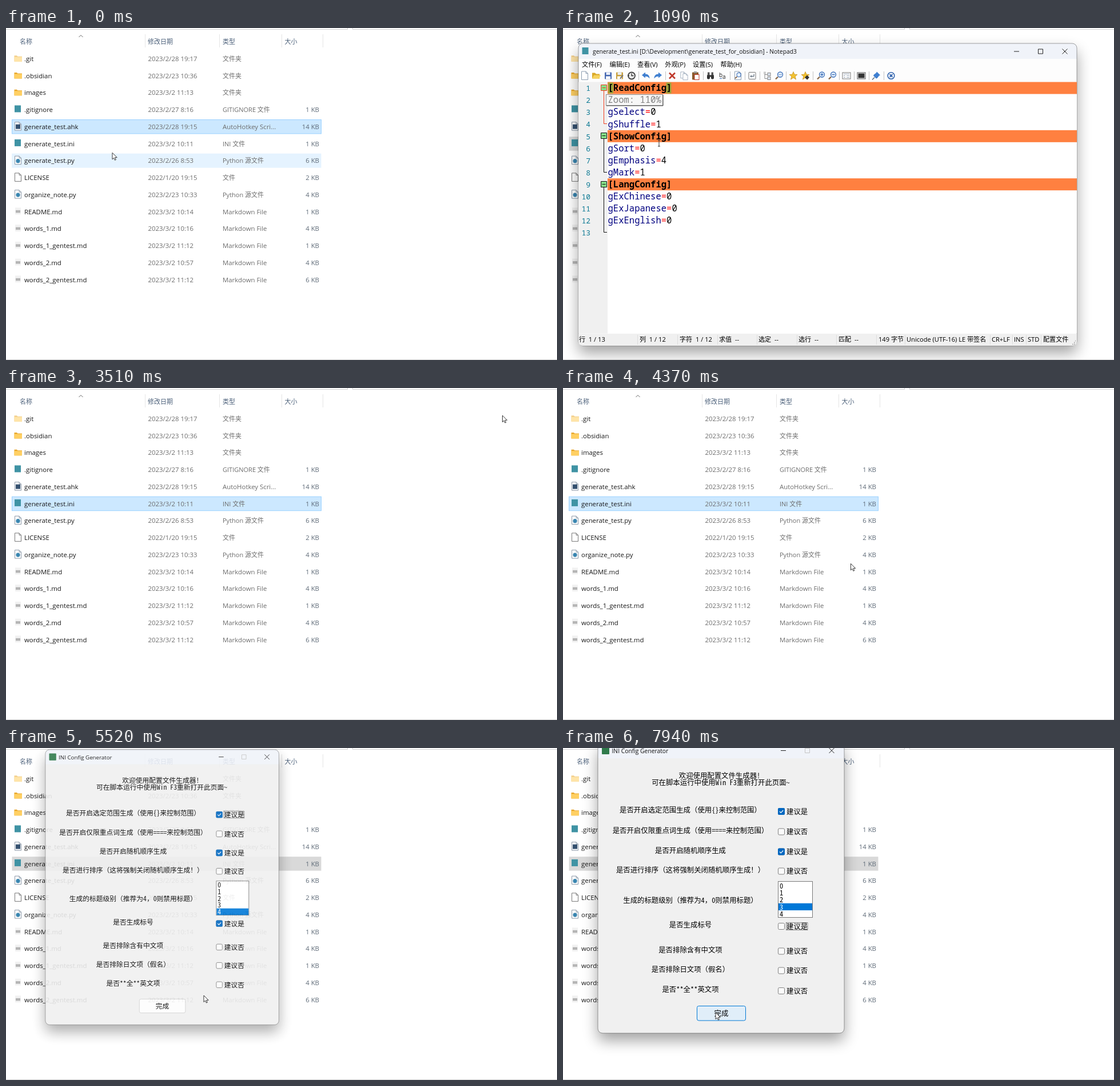
An HTML page that plays this animation: 964 px wide and 581 px high, repeating every 8 s.

```html
<!DOCTYPE html>
<html lang="zh-CN">
<head>
<meta charset="utf-8">
<title>INI Config Generator</title>
<style>
html,body{margin:0;width:100%;height:100%;overflow:hidden;background:#fff}
svg{display:block;width:100vw;height:100vh}
text{font-family:'Open Sans','Noto Sans CJK SC','Noto Sans CJK',sans-serif;white-space:pre}
.code text{font-family:'Noto Sans Mono','DejaVu Sans Mono',monospace}
.song text{font-family:'Noto Sans Mono CJK SC','Noto Sans CJK SC','Noto Sans CJK',sans-serif;font-weight:300}
.off{filter:grayscale(1);opacity:.5}
</style>
</head>
<body>
<svg id="stage" viewBox="0 0 964 581"></svg>
<script>
const LOOP = 8000;
const OPEN_EDITOR = 660, CLOSE_EDITOR = 3345, OPEN_DIALOG = 5472;
const SELECT_INI = 400, CLICK_LINE = 2270, PICK_LEVEL = 6370, UNCHECK = 7110;

const text = (x, y, s, size, fill = '#000', more = '') =>
  `<text x="${x}" y="${y}" font-size="${size}" fill="${fill}" ${more}>${s}</text>`;
const rect = (x, y, w, h, fill, more = '') =>
  `<rect x="${x}" y="${y}" width="${w}" height="${h}" fill="${fill}" ${more}/>`;
const line = (d, color, more = '') => `<path d="${d}" fill="none" stroke="${color}" ${more}/>`;
const shape = (d, fill, more = '') => `<path d="${d}" fill="${fill}" ${more}/>`;
const group = (body, more = '') => `<g ${more}>${body}</g>`;
const MIDDLE = 'text-anchor="middle"', END = 'text-anchor="end"';

/* File list */
const files = [
  ['folder', '.git', '2023/2/28 19:17', '文件夹', '', .55],
  ['folder', '.obsidian', '2023/2/23 10:36', '文件夹', ''],
  ['folder', 'images', '2023/3/2 11:13', '文件夹', ''],
  ['note', '.gitignore', '2023/2/27 8:16', 'GITIGNORE 文件', '1 KB'],
  ['ahk', 'generate_test.ahk', '2023/2/28 19:15', 'AutoHotkey Scri...', '14 KB'],
  ['note', 'generate_test.ini', '2023/3/2 10:11', 'INI 文件', '1 KB'],
  ['py', 'generate_test.py', '2023/2/26 8:53', 'Python 源文件', '6 KB'],
  ['page', 'LICENSE', '2022/1/20 19:15', '文件', '2 KB'],
  ['py', 'organize_note.py', '2023/2/23 10:33', 'Python 源文件', '4 KB'],
  ['md', 'README.md', '2023/3/2 10:14', 'Markdown File', '1 KB'],
  ['md', 'words_1.md', '2023/3/2 10:16', 'Markdown File', '4 KB'],
  ['md', 'words_1_gentest.md', '2023/3/2 11:12', 'Markdown File', '1 KB'],
  ['md', 'words_2.md', '2023/3/2 10:57', 'Markdown File', '4 KB'],
  ['md', 'words_2_gentest.md', '2023/3/2 11:12', 'Markdown File', '6 KB']
];
const rowY = i => 53.7 + 29.74 * i;
const uiSize = s => /[一-龥]/.test(s) ? 11 : 11.4;
const page = color => shape('M-5.5-7.5H2L5.5-4V7H-5.5Z', '#fff', `stroke="${color}"`) +
  line('M2-7.5V-4H5.5', color);
const fileIcons = {
  folder: shape('M-6.5-5H-2L-.5-3.5H7V5.5H-6.5Z', '#e8a72c') + rect(-6.5, -2.5, 13.5, 8, '#ffd063'),
  note: rect(-6, -7, 11, 12, '#3f93a4'),
  page: page('#777'),
  ahk: page('#8a97a6') + rect(-4, -3.5, 8, 8, '#34506f'),
  py: page('#8a97a6') + '<circle cy="1" r="3.6" fill="#3a86b0"/>',
  md: rect(-5, -6.5, 10, 12, '#f2f2f2') + rect(-4, -2, 8, 4.5, '#b5b5b5')
};

function explorer() {
  let s = line('M0 2.5H597.5V0M964 2.5H606.5V0M0 580.5H964', '#d2d2d2') +
    line('M243.5 11V34M373.5 11V34M482.5 11V34M554.5 11V34', '#e5e5e5') +
    line('M127.5 16L131 12.5L134.5 16', '#666');
  [[24, '名称'], [248, '修改日期'], [379, '类型'], [487.5, '大小']]
    .forEach(([x, name]) => s += text(x, 27.5, name, 11, '#4c607a'));
  s += rect(10, 0, 541.5, 25, '#e5f3ff', 'id="hover"') +
    rect(10.5, 0, 541, 24.5, '#cce8ff', 'id="picked"');
  files.forEach(([icon, name, date, type, size, alpha = 1], i) => {
    const y = rowY(i), base = y + 4.2;
    s += group(fileIcons[icon], `transform="translate(21 ${y - .5})" opacity="${alpha}"`) +
      text(32, base, name, 11.4, '#191919') +
      text(248.5, base, date, 11.4, '#6d6d6d') +
      text(379, base, type, uiSize(type), '#6d6d6d') +
      text(548, base, size, 11.4, '#5f6b78', END);
  });
  return s;
}

/* Shared window frame */
function frame(x, y, w, h, bar, body) {
  return rect(x, y + 13, w, h, '#000', 'rx="8" opacity=".36" filter="url(#blur)"') +
    rect(x, y, w, h, body, 'rx="8"') +
    shape(`M${x} ${y + bar}V${y + 8}q0-8 8-8H${x + w - 8}q8 0 8 8V${y + bar}Z`, '#f0f3f9') +
    rect(x, y, w, h, 'none', 'rx="8" stroke="#000" stroke-opacity=".35"');
}
const buttons = (x, y, maxColor) => line(`M${x - 89} ${y}h9`, '#222') +
  line(`M${x - 46.5} ${y - 4}h8v8h-8z`, maxColor) +
  line(`M${x - 4.5} ${y - 4.5}l9 9m0-9l-9 9`, '#222');

/* Editor toolbar */
const lens = (inner, c = '#3d6fb8') => line('M-2 2L-6 6', '#8a6a4a', 'stroke-width="2.4"') +
  `<circle cx="2" cy="-2" r="4.5" fill="#e4effc" stroke="${c}" stroke-width="1.3"/>` + line(inner, c, 'stroke-width="1.4"');
const star = shape('M0-7L2-2.3L7-2L3.2 1.2L4.5 6.5L0 3.5L-4.5 6.5L-3.2 1.2L-7-2L-2-2.3Z', '#f2c230', 'stroke="#c08a1c" stroke-width=".7"');
const disk = c => rect(-6, -6, 12, 12, c, 'rx="1"') + rect(-3.5, -6, 7, 4.5, '#e9eef8') + rect(-4, 1, 8, 5, '#fff');
const bend = shape('M-7-1L-1-6V-3C4-3 6.5 0 6.5 5C4 1.5 2 1-1 1.2V4Z', '#3f7fd0');
const pane = c => rect(-7, -5.5, 14, 11, '#fff', `stroke="${c}"`);
const sheet = page('#8c9db0');
const tools = [
  [38, sheet],
  [58, shape('M-7-5H-2L0-3H6V5H-7Z', '#d9a827') + shape('M-7 5L-4-1H8L5 5Z', '#f6d35e')],
  [79, disk('#4467b0'), 1],
  [99, disk('#c9a03c') + line('M1 5L6-1', '#777', 'stroke-width="2"')],
  [120, '<circle r="6" fill="#ececec" stroke="#444" stroke-width="1.8"/>' + line('M0-4V0H3.5M-7 0H-4', '#333', 'stroke-width="1.3"')],
  [145, bend, 1],
  [166, group(bend, 'transform="scale(-1 1)"'), 1],
  [191, line('M-5-5L5 5M5-5L-5 5', '#c0392b', 'stroke-width="2.6"'), 1],
  [212, group(sheet, 'transform="translate(-2 -1) scale(.75)"') + group(sheet, 'transform="translate(2 2) scale(.75)"'), 1],
  [232, rect(-6, -6, 11, 13, '#8a5a2c', 'rx="1"') + rect(-3, -7.5, 5, 3, '#999') + rect(-2, -2, 8, 9, '#fff', 'stroke="#c0392b"')],
  [258, rect(-6, -2, 5, 8, '#333', 'rx="2"') + rect(1, -2, 5, 8, '#333', 'rx="2"') + rect(-5, -6, 3.5, 5, '#555') + rect(1.5, -6, 3.5, 5, '#555') + rect(-2, -1, 4, 3, '#333')],
  [279, text(-6, 2, 'b', 10, '#222') + text(0, 5, 'a', 10, '#222') + line('M-5 5H-1', '#3d6fb8')],
  [306, sheet + group(lens('M0 0'), 'transform="scale(.8)"')],
  [331, rect(-6, -6, 12, 12, '#fff', 'stroke="#777" rx="1"') + line('M3-3V1H-3M-1-1L-3 1L-1 3', '#456')],
  [357, line('M-4-6V5H2M-4-2H2', '#888') + rect(-6, -7, 4, 4, '#ccc') + rect(1, -5, 5, 5, '#dde6f2', 'stroke="#888"') + rect(1, 2, 5, 5, '#dde6f2', 'stroke="#888"')],
  [378, lens('M-.5-2h1m1 0h1m1 0h1')],
  [403, star],
  [424, star + shape('M3-1L7 3L3 7L-1 3Z', '#333')],
  [451, lens('M-.5-2H4.5M2-4.5V.5')],
  [471, lens('M-.5-2H4.5')],
  [496, pane('#777') + line('M-5-3H5M-5 0H-2M0 0H5M-5 3H-2M0 3H5', '#9aa7b8')],
  [522, pane('#555') + rect(-5.5, -4, 11, 8, '#333')],
  [548, shape('M1-7L7-1L5 0L2 4L0 5L-5 0L-4-2L0-5Z', '#3f7fd0') + line('M-3 3L-7 7', '#567', 'stroke-width="1.4"')],
  [574, '<circle r="5.8" fill="#fff" stroke="#2f62ad" stroke-width="1.6"/>' + line('M-2.5-2.5L2.5 2.5M2.5-2.5L-2.5 2.5', '#2f62ad', 'stroke-width="1.8"')]
];
const toolGaps = [132.5, 179.5, 245.5, 292.5, 318.5, 344.5, 390.5, 437.5, 483.5, 509.5, 535.5, 561.5];

const ini = ['[ReadConfig]', 'gScope=1', 'gSelect=0', 'gShuffle=1', '[ShowConfig]', 'gSort=0', 'gEmphasis=4',
  'gMark=1', '[LangConfig]', 'gExChinese=0', 'gExJapanese=0', 'gExEnglish=0', ''];
const lineY = i => 105 + 21.08 * i;
const MONO = 15.55;

function editor() {
  let s = frame(27, 27, 872, 529, 27, '#fdfdfd') + rect(33.5, 34, 11, 12, '#3f93a4') +
    text(52, 45, 'generate_test.ini [D:\\Development\\generate_test_for_obsidian] - Notepad3', 10.3, '#111') +
    buttons(878, 41, '#222');
  ['文件(F)', '编辑(E)', '查看(V)', '外观(P)', '设置(S)', '帮助(H)']
    .forEach((m, i) => s += text(33 + 48.5 * i, 67.5, m, 11.2));
  s += group([321.5, 440.5].map(x => rect(x, 74.5, 20, 18, '#cce4f7', 'stroke="#90c8f6"')).join(''), 'id="toggles"');
  s += tools.map(([x, icon, dims]) => group(icon, `transform="translate(${x} 83.5)"` + (dims ? ' data-dims' : ''))).join('') +
    line(toolGaps.map(x => `M${x} 76V91`).join(''), '#c4c4c4');

  let code = rect(27, 94.5, 51, 440, '#f0f0f0') + rect(78, 94.5, 821, 440, '#fff') +
    rect(79, 347.5, 819, 19.5, 'none', 'id="current" stroke="#e2e2e2" stroke-width="1.5"');
  ini.forEach((row, i) => {
    const y = lineY(i), base = y + 5.3;
    code += text(48, y + 5.2, i + 1, 12.9, '#0d7a94', END + ' font-weight="500"');
    if (row[0] === '[') {
      code += rect(78, y - 10.5, 821, 21, '#ff8040');
      if (!i) code += group(rect(79, y - 9.5, 9, 19, '#9da43c') + rect(180.5, y - 9.5, 9, 19, '#9da43c'), 'id="match"');
      code += text(78.5, base, row, MONO, '#000', 'font-weight="bold"');
    } else if (row) {
      const [key, value] = row.split('=');
      code += text(78.5, base, `${key}<tspan fill="#f00">=</tspan><tspan fill="#000">${value}</tspan>`, MONO, '#000080');
    }
  });
  [[0, 3], [4, 7], [8, 12]].forEach(([a, b]) => {
    const top = Math.round(lineY(a)) - .5, end = Math.round(lineY(b)) - .5;
    code += group(shape(`M66.5 ${top - 5}h10v10h-10z`, '#86e08a') +
      line(`M68.5 ${top}h6M71.5 ${top + 5}V${end}H77`, 'inherit'), 'class="fold" stroke="#111"');
  });
  code += group(rect(75.5, 116.5, 99, 19, '#f7f7f7', 'stroke="#8a8a8a"') + line('M76 136H175V117', '#444') +
    text(78.5, 131, 'Zoom: 110%', MONO, '#808080'), 'id="zoom"');
  s += group(code.replaceAll('stroke="inherit"', ''), 'class="code"');

  s += shape('M27 535H899V548q0 8-8 8H35q-8 0-8-8Z', '#f0f0f0') +
    line([130, 200, 270, 339, 409, 478, 548, 598, 747, 786, 810, 836].map(x => `M${x}.5 537V554`).join(''), '#dcdcdc');
  [[28, '行', 'row'], [134, '列', 'col'], [204, '字符', 'chr'], [273, '求值  --'], [342, '选定  --'], [412, '选行  --'],
    [482, '匹配  --'], [552, '149 字节'], [601, 'Unicode (UTF-16) LE 带签名'], [750, 'CR+LF'], [789, 'INS'],
    [813, 'STD'], [840, '配置文件']]
    .forEach(([x, label, id]) => s += text(x, 549, label, 11.1, '#000', id ? `id="${id}"` : ''));
  return s + line('M891 553.5h6M894 550.5h3M896 547.5h1', '#aaa', 'stroke-width="2" stroke-dasharray="1.6 1.4"');
}

/* Settings dialog */
const SONG = 12.4;
const options = [
  [108, 111, '是否开启选定范围生成（使用{}来控制范围）', 1],
  [144, 146.5, '是否开启仅限重点词生成（使用====来控制范围）', 0],
  [179, 181.5, '是否开启随机顺序生成', 1],
  [213, 215.5, '是否进行排序（这将强制关闭随机顺序生成！）', 0],
  [266, 0, '生成的标题级别（推荐为4，0则禁用标题）'],
  [309.5, 312, '是否生成标号', 1],
  [353, 355.5, '是否排除含有中文项', 0],
  [387, 389.5, '是否排除日文项（假名）', 0],
  [422.5, 425, '是否**全**英文项', 0]
];
const levelY = i => 241 + 12.35 * i;

function dialog() {
  let s = frame(61, -9, 431, 508, 27, '#f0f0f0') + rect(68, -2, 13, 13, '#2f7a4b', 'rx="1"') +
    text(85.5, 8.7, 'INI Config Generator', 10.3, '#111') + buttons(470, 4.5, '#c4c4c4');
  let body = text(274, 52.6, '欢迎使用配置文件生成器!', SONG, '#000', MIDDLE) +
    text(276, 65, '可在脚本运行中使用Win F3重新打开此页面~', SONG, '#000', MIDDLE);
  options.forEach(([y, boxY, label, on], i) => {
    body += text(223, y + 4.6, label, SONG, '#000', MIDDLE);
    if (!boxY) return;
    body += rect(376.5, boxY - 5.5, 11, 11, '#fbfbfb', 'rx="2" stroke="#808080"') +
      text(391, boxY + 4.6, on ? '建议是' : '建议否', SONG);
    if (on) body += group(rect(376, boxY - 6, 12, 12, '#0067c0', 'rx="2"') +
      line(`M379 ${boxY}l2.2 2.3l4-4.3`, '#fff', 'stroke-width="1.2"'), `id="tick${i}"`);
  });
  body += rect(376.5, 233.5, 60, 63, '#fff', 'stroke="#7a7a7a"') + rect(377, 0, 59, 12.3, '#0078d7', 'id="bar"');
  for (let i = 0; i < 5; i++) body += text(379, levelY(i) + 4.6, i, SONG, '#000', 'class="level"');
  body += rect(390.5, 0, 37.5, 13, 'none', 'id="focus" stroke="#222" stroke-dasharray="1 1"') +
    rect(234.5, 451.5, 85, 25.5, '#fdfdfd', 'id="done" rx="3" stroke="#d0d0d0"') +
    text(277, 468.6, '完成', SONG, '#000', MIDDLE);
  return s + group(body, 'class="song"');
}

document.getElementById('stage').innerHTML =
  '<defs><filter id="blur" x="-20%" y="-20%" width="140%" height="140%"><feGaussianBlur stdDeviation="13"/></filter></defs>' +
  rect(0, 0, 964, 581, '#fff') + explorer() +
  group(editor(), 'id="editor"') + group(dialog(), 'id="dialog"') +
  group('<circle id="press" cy="1" r="11.5" fill="#ffee20" opacity=".65"/>' +
    shape('M0 0V11.5L2.7 9L4.4 13L6.3 12.2L4.6 8.3H8.2Z', '#fff', 'id="arrow" stroke="#222" stroke-width=".9"') +
    line('M-2-5.5H2M0-5.5V5M-2 5H2', '#333', 'id="beam"'), 'id="cursor"');

const el = {};
document.querySelectorAll('[id]').forEach(n => el[n.id] = n);
const folds = document.querySelectorAll('.fold');
const levels = document.querySelectorAll('.level');
const dimmed = document.querySelectorAll('[data-dims]');
const set = (n, attrs) => { for (const k in attrs) n.setAttribute(k, attrs[k]); };
const show = (n, on) => n.setAttribute('visibility', on ? 'inherit' : 'hidden');

/* Pointer path: time, x, y */
const path = [[0, 186, 218.3], [80, 186, 218.3], [300, 190, 205], [640, 190, 205], [820, 168, 202], [1700, 168, 202],
  [1950, 436, 194], [2230, 640, 390], [2330, 640, 390], [2520, 643, 285], [2640, 673, 264], [2840, 793, 107],
  [3060, 872, 46], [3300, 868.5, 48], [3520, 868.5, 48], [4240, 550, 287], [4370, 503.5, 307.3], [4700, 440, 335],
  [5100, 390, 360], [5480, 346, 433], [5600, 346, 433], [5910, 395, 312], [5980, 395, 312], [6180, 400, 279],
  [6480, 400, 279], [6950, 394, 314], [7200, 394, 314], [7750, 267, 463], [LOOP, 267, 463]];
const presses = [[380, 80], [530, 80], [2250, 90], [3340, 60], [6320, 130], [7040, 120]];

function pointer(t) {
  const i = path.findIndex(p => p[0] > t);
  const [a, b] = [path[i - 1], path[i]];
  const u = (t - a[0]) / (b[0] - a[0]), k = u * u * (3 - 2 * u);
  return [a[1] + (b[1] - a[1]) * k, a[2] + (b[2] - a[2]) * k];
}
const ease = u => 1 - (1 - Math.min(1, Math.max(0, u))) ** 3;

function pop(node, p, cx, cy) {
  const k = .9 + .1 * p;
  show(node, p > 0);
  set(node, {
    opacity: Math.min(1, p * 1.85),
    transform: `translate(${cx * (1 - k)} ${cy * (1 - k)}) scale(${k})`
  });
}

function draw(t) {
  const [x, y] = pointer(t);
  const editing = t >= OPEN_EDITOR && t < CLOSE_EDITOR + 50;
  const covered = editing || t >= OPEN_DIALOG;

  const picked = t < SELECT_INI ? 4 : 5;
  set(el.picked, { y: rowY(picked) - 12.2, fill: covered ? '#d9d9d9' : '#cce8ff', stroke: covered ? 'none' : '#99d1ff' });
  const hover = x > 10 && x < 551 ? files.findIndex((f, i) => Math.abs(y - rowY(i)) < 14) : -1;
  show(el.hover, !covered && hover >= 0 && hover !== picked);
  set(el.hover, { y: rowY(Math.max(0, hover)) - 12.5 });

  const closing = 1 - ease((t - CLOSE_EDITOR) / 180);
  pop(el.editor, t < CLOSE_EDITOR ? ease((t - OPEN_EDITOR) / 220) : closing, 463, 291);
  const settled = t >= 1160, atEnd = t >= CLICK_LINE;
  show(el.zoom, t > 960 && t < 1560);
  show(el.toggles, settled);
  dimmed.forEach(n => n.classList.toggle('off', settled));
  show(el.match, !atEnd);
  show(el.current, atEnd);
  folds.forEach((f, i) => set(f, { stroke: i === (atEnd ? 2 : 0) ? '#f03c1e' : '#111' }));
  el.row.textContent = atEnd ? '行  13 / 13' : '行  1 / 13';
  el.col.textContent = '列  1 / ' + (atEnd ? 0 : 12);
  el.chr.textContent = '字符  1 / ' + (atEnd ? 0 : 12);

  pop(el.dialog, ease((t - OPEN_DIALOG) / 250), 212, 219);
  const level = t < PICK_LEVEL ? 4 : 3;
  set(el.bar, { y: levelY(level) - 6.3 });
  levels.forEach((n, i) => set(n, { fill: i === level ? '#fff' : '#000' }));
  show(el.tick5, t < UNCHECK);
  show(el.focus, t < PICK_LEVEL ? t >= OPEN_DIALOG : t >= UNCHECK);
  if (t < OPEN_DIALOG) show(el.focus, false);
  set(el.focus, { y: t < UNCHECK ? 104.5 : 305.5 });
  const over = t > UNCHECK && x > 234 && x < 320 && y > 451 && y < 477;
  set(el.done, { fill: over ? '#e0eef9' : '#fdfdfd', stroke: over ? '#0078d4' : '#d0d0d0' });

  const beam = t >= 800 && t < CLOSE_EDITOR && y > 94 && y < 534;
  set(el.cursor, { transform: `translate(${x} ${y})` });
  show(el.beam, beam);
  show(el.arrow, !beam);
  show(el.press, presses.some(([at, len]) => t >= at && t < at + len));
}

const start = performance.now();
function tick() {
  draw((performance.now() - start) % LOOP);
  requestAnimationFrame(tick);
}
tick();
</script>
</body>
</html>
```
